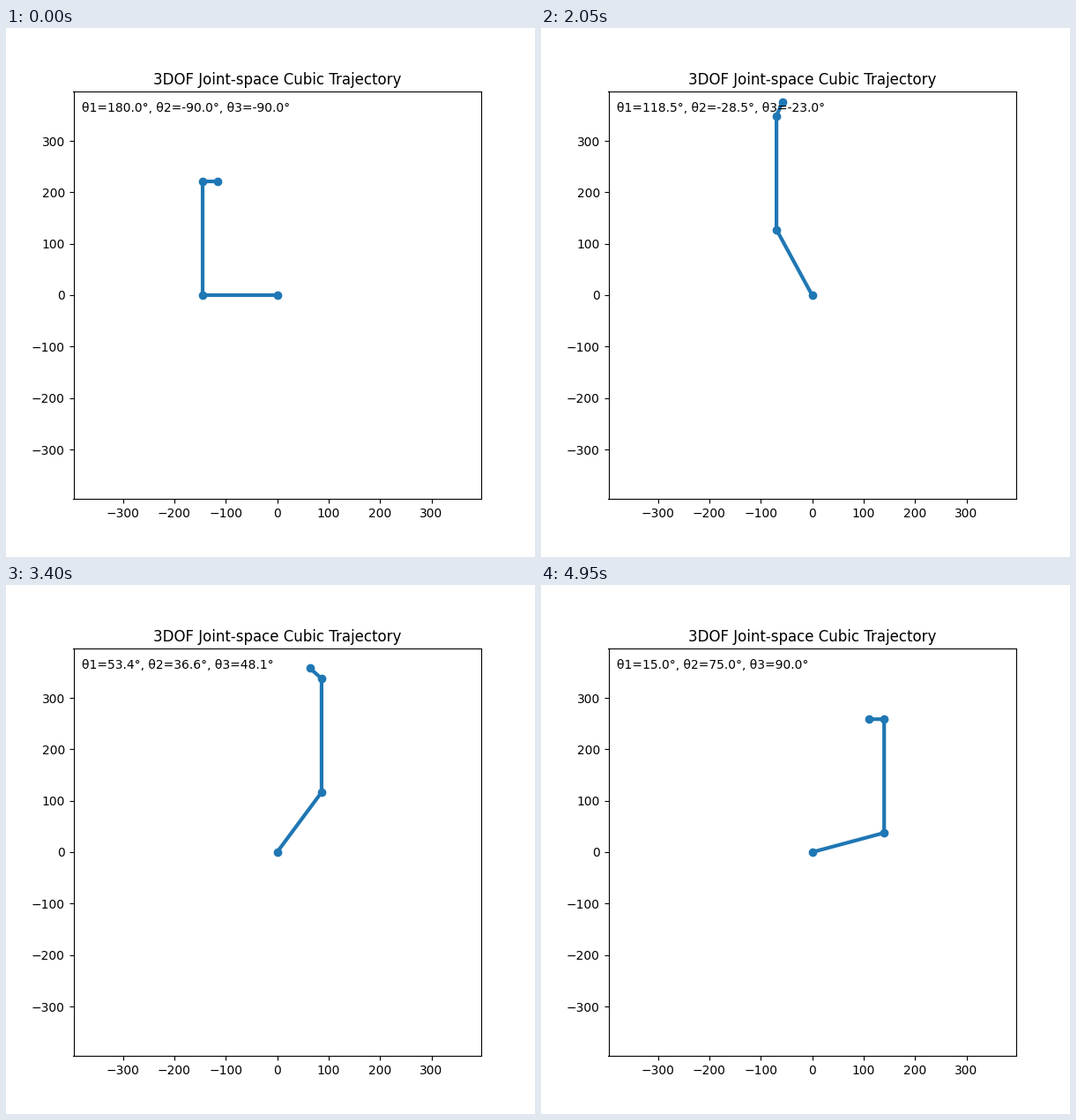
Recreate the animation shown at these times as a matplotlib script. Size 600 by 600 pixels, loop 5 s.

```python
import matplotlib.pyplot as plt
import numpy as np
from matplotlib.animation import FuncAnimation

FRAMES = 100
INTERVAL = 50  # ms
LINKS = np.array([145, 221, 30])
START = np.array([180.0, -90.0, -90.0])
END = np.array([15.0, 75.0, 90.0])


def joint_angles(i):
    """Cubic blend with zero speed at both ends, in degrees."""
    u = i / (FRAMES - 1)
    return START + (END - START) * (3 * u**2 - 2 * u**3)


def arm_points(angles):
    heading = np.radians(np.cumsum(angles))
    x = np.cumsum(LINKS * np.cos(heading))
    y = np.cumsum(LINKS * np.sin(heading))
    return np.append(0, x), np.append(0, y)


fig, ax = plt.subplots(figsize=(6, 6), dpi=100)
reach = LINKS.sum()
ax.set_xlim(-reach, reach)
ax.set_ylim(-reach, reach)
ax.set_aspect("equal")
ax.set_title("3DOF Joint-space Cubic Trajectory")
arm, = ax.plot([], [], "o-", lw=3)
label = ax.text(0.02, 0.95, "", transform=ax.transAxes)


def update(i):
    angles = joint_angles(i)
    arm.set_data(*arm_points(angles))
    label.set_text(", ".join(f"θ{k}={a:.1f}°" for k, a in enumerate(angles, 1)))
    return arm, label


anim = FuncAnimation(fig, update, frames=FRAMES, interval=INTERVAL, repeat=True)
plt.show()
```
